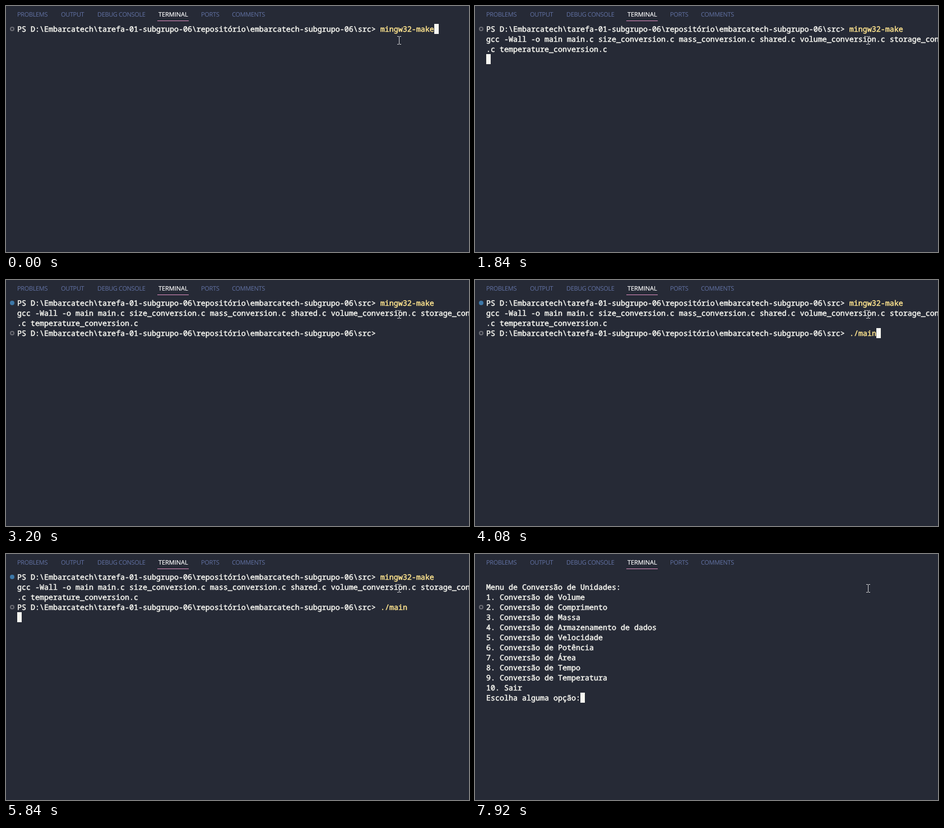
Animation of 826x440 px, one loop 8 s. Source, as an HTML page:

```html
<!DOCTYPE html>
<html lang="pt">
<head>
<meta charset="utf-8">
<title>Terminal</title>
<style>
  :root { --bg: #262a36; --fg: #f8f8f2; --cmd: #ffe58f; }
  html, body { margin: 0; width: 100%; height: 100%; overflow: hidden; background: var(--bg); }
  #stage { position: relative; width: 826px; height: 440px; overflow: hidden; background: var(--bg); }
  #stage > * { position: absolute; }

  .tab {
    top: 8px; white-space: pre;
    font: 11px/16px "Open Sans", "Noto Sans", sans-serif;
    letter-spacing: -.35px; color: #6272a4;
    text-rendering: geometricPrecision;
  }
  .active { color: #fff; letter-spacing: -.05px; -webkit-text-stroke: .2px; }
  .underline { left: 270px; top: 26px; width: 56px; height: 1px; background: #e08fc0; }

  pre {
    left: 20px; margin: 0; color: var(--fg);
    font: 500 13.333px/18px "Noto Sans Mono", "DejaVu Sans Mono", monospace;
    font-variant-ligatures: none;
    text-rendering: geometricPrecision;
    -webkit-text-stroke: .5px;
  }
  b { font-weight: inherit; color: var(--cmd); }
  .r1 { top: 32px; }
  .r2 { top: 50px; }
  .r4 { top: 86px; }
  .typed { left: 668px; overflow: hidden; color: var(--cmd); }

  .ring, .done { left: 7px; box-sizing: border-box; width: 8px; height: 8px; border-radius: 50%; }
  .ring { border: 2px solid #6a6b73; }
  .done { background: #3d78a8; }
  .d1 { top: 37px; }
  .d4 { top: 91px; }

  .cursor { left: 20px; top: 32px; width: 8px; height: 18px; background: var(--fg); }
  .mouse { left: 697px; top: 53px; }

  /* one percent of the loop is 80 ms */
  .anim { animation: 8s step-end infinite; }
  .command { animation-name: command; }
  .output { animation-name: output; }
  .building { animation-name: building; }
  .built { animation-name: built; }
  .second { animation-name: second; }
  .menu { animation-name: menu; }
  .typed { animation-name: typing; }
  .cursor { animation-name: cursor; }

  @keyframes command { 0% { opacity: 1 } 77%, 100% { opacity: 0 } }
  @keyframes output { 0% { opacity: 0 } 14% { opacity: 1 } 77%, 100% { opacity: 0 } }
  @keyframes building { 0% { opacity: 1 } 29%, 100% { opacity: 0 } }
  @keyframes built { 0% { opacity: 0 } 29% { opacity: 1 } 77%, 100% { opacity: 0 } }
  @keyframes second { 0% { opacity: 0 } 29%, 100% { opacity: 1 } }
  @keyframes menu { 0% { opacity: 0 } 78%, 100% { opacity: 1 } }
  @keyframes typing {
    0% { width: 0 }
    45% { width: 8px }
    46% { width: 16px }
    47% { width: 24px }
    48% { width: 32px }
    49% { width: 40px }
    50% { width: 48px }
    77%, 100% { width: 0 }
  }
  @keyframes cursor {
    0% { transform: translate(744px, 0); opacity: 1 }
    6% { transform: translate(0, 18px); opacity: 1 }
    14% { transform: translate(0, 54px); opacity: 1 }
    29% { transform: translate(648px, 54px); opacity: 1 }
    36.5% { transform: translate(648px, 54px); opacity: 0 }
    44% { transform: translate(648px, 54px); opacity: 1 }
    45% { transform: translate(656px, 54px); opacity: 1 }
    46% { transform: translate(664px, 54px); opacity: 1 }
    47% { transform: translate(672px, 54px); opacity: 1 }
    48% { transform: translate(680px, 54px); opacity: 1 }
    49% { transform: translate(688px, 54px); opacity: 1 }
    50% { transform: translate(696px, 54px); opacity: 1 }
    62% { transform: translate(0, 72px); opacity: 1 }
    78%, 100% { transform: translate(168px, 216px); opacity: 1 }
  }
</style>
</head>
<body>
<div id="stage">
  <span class="tab" style="left:20px">PROBLEMS</span>
  <span class="tab" style="left:98px">OUTPUT</span>
  <span class="tab" style="left:163px">DEBUG CONSOLE</span>
  <span class="tab active" style="left:272px">TERMINAL</span>
  <span class="tab" style="left:348px">PORTS</span>
  <span class="tab" style="left:403px">COMMENTS</span>
  <div class="underline"></div>

  <div class="ring d1 anim building"></div>
  <div class="done d1 anim built"></div>
  <div class="ring d4 anim second"></div>

  <pre class="r1 anim command">PS D:\Embarcatech\tarefa-01-subgrupo-06\repositório\embarcatech-subgrupo-06\src> <b>mingw32-make</b></pre>
  <pre class="r2 anim output">gcc -Wall -o main main.c size_conversion.c mass_conversion.c shared.c volume_conversion.c storage_con
.c temperature_conversion.c</pre>
  <pre class="r4 anim built">PS D:\Embarcatech\tarefa-01-subgrupo-06\repositório\embarcatech-subgrupo-06\src></pre>
  <pre class="r4 anim typed">./main</pre>
  <pre class="r2 anim menu">Menu de Conversão de Unidades:
1. Conversão de Volume
2. Conversão de Comprimento
3. Conversão de Massa
4. Conversão de Armazenamento de dados
5. Conversão de Velocidade
6. Conversão de Potência
7. Conversão de Área
8. Conversão de Tempo
9. Conversão de Temperatura
10. Sair
Escolha alguma opção:</pre>

  <div class="cursor anim"></div>
  <svg class="mouse" width="9" height="17" fill="none" stroke="#d4d4d6">
    <path d="M1 1.5H4M5 1.5H8M4.5 2V15M1 15.5H4M5 15.5H8"/>
  </svg>
</div>
</body>
</html>
```
